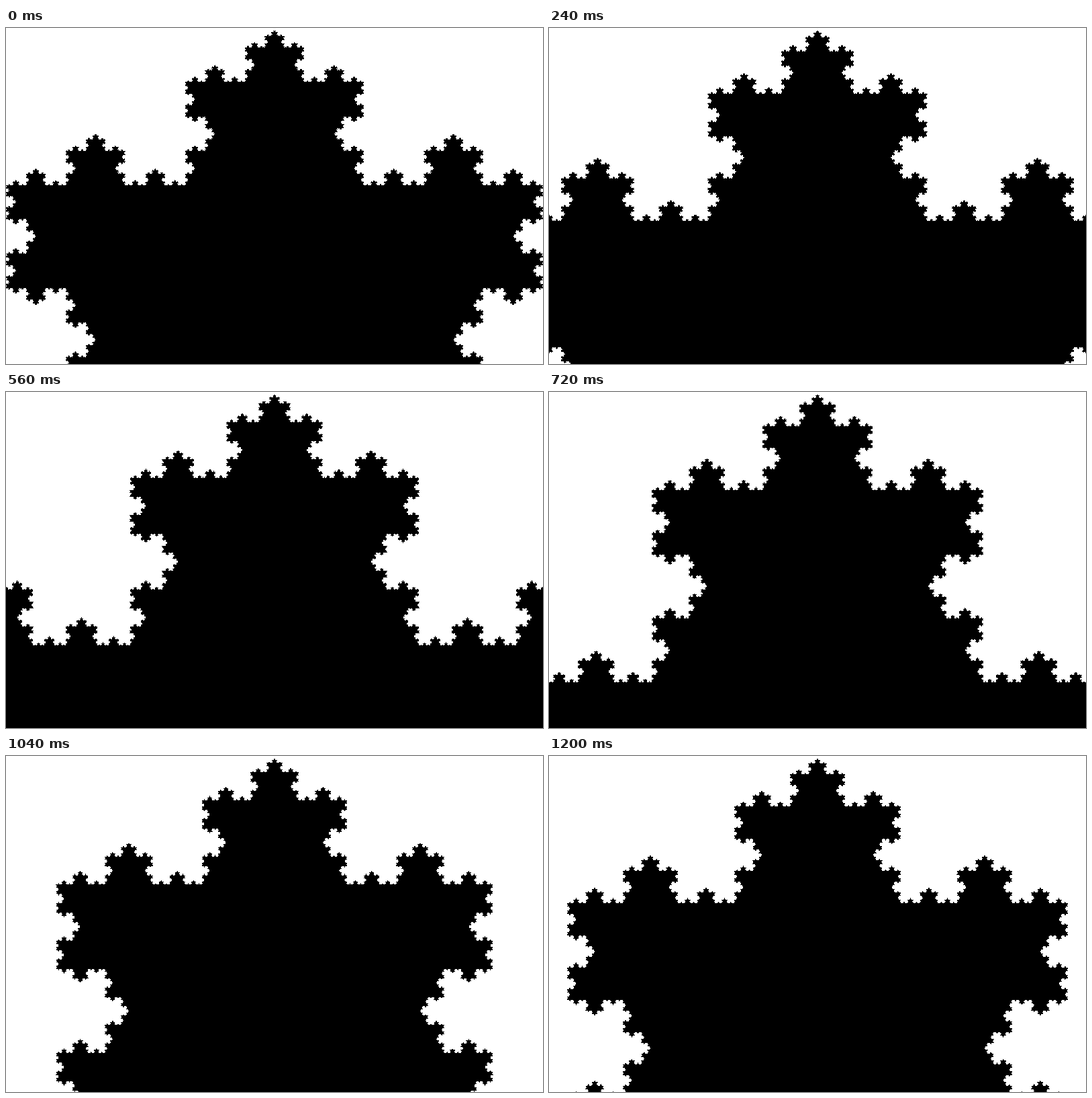
Write an HTML page that moves like this. It is 800 by 500 pixels and loops after 1.28 s.

```html
<!DOCTYPE html>
<html lang="en">
<head>
<meta charset="utf-8">
<title>Koch snowflake zoom</title>
<style>
  html, body { margin: 0; height: 100%; overflow: hidden; background: #fff; }
  svg { display: block; }
</style>
</head>
<body>
<svg width="800" height="500" viewBox="0 0 800 500">
  <path id="flake" shape-rendering="crispEdges"/>
</svg>
<script>
const LOOP = 1280, STEP = 80, SIDE = 800, DEPTH = 6;
const APEX_X = 400, APEX_Y = 3.5;
const SIN60 = Math.sqrt(3) / 2;
const TOP = SIDE / 3 * SIN60;  // from the apex down to the upper side
const RISE = 1.5;              // the lower sides sit slightly higher
const flake = document.getElementById('flake');
const points = [];

// Adds a Koch curve from (x, y) along (dx, dy), bumps on the left.
function koch(x, y, dx, dy, depth = DEPTH) {
  if (depth === 0) {
    points.push(`${x.toFixed(3)} ${y.toFixed(3)}`);
    return;
  }
  const ax = dx / 3, ay = dy / 3;
  const bx = ax / 2 + ay * SIN60, by = ay / 2 - ax * SIN60;
  koch(x, y, ax, ay, depth - 1);
  koch(x + ax, y + ay, bx, by, depth - 1);
  koch(x + ax + bx, y + ay + by, ax - bx, ay - by, depth - 1);
  koch(x + 2 * ax, y + 2 * ay, ax, ay, depth - 1);
}

// The apex is the origin, so scaling by 3 maps the visible part onto itself.
const half = SIDE / 2, height = SIDE * SIN60;
koch(-half, TOP, SIDE, 0);
koch(half, TOP - RISE, -half, height);
koch(0, TOP - RISE + height, -half, -height);
flake.setAttribute('d', `M${points.join('L')}Z`);

function draw(now) {
  const time = Math.floor((now % LOOP) / STEP) * STEP;
  const zoom = 3 ** (time / LOOP);
  flake.setAttribute('transform', `translate(${APEX_X} ${APEX_Y}) scale(${zoom})`);
  requestAnimationFrame(draw);
}

draw(0);
</script>
</body>
</html>
```
